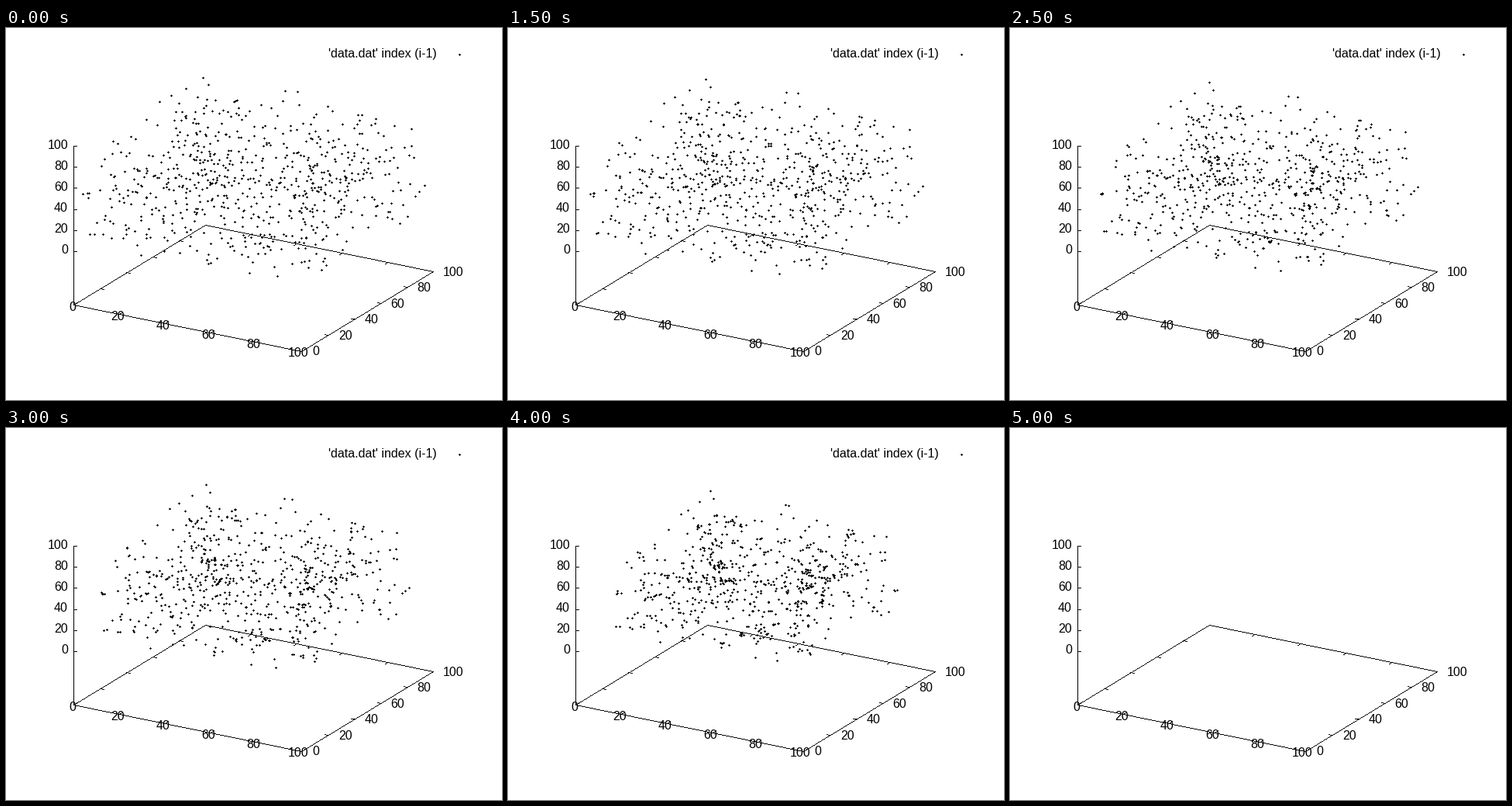
A matplotlib script that plays this animation: 640 by 480 pixels, repeating every 5.5 s.

```python
import numpy as np
import matplotlib.pyplot as plt
from matplotlib.animation import FuncAnimation
from matplotlib.collections import LineCollection

plt.rcParams["font.family"] = "Liberation Sans"

W, H, DPI = 640, 480, 80
PX = 72 / DPI                       # one pixel in points
FRAMES, INTERVAL = 11, 500
COUNT, PULL, SOFT = 700, 6000.0, 2.5
STEP, SUBSTEPS = 0.1, 5             # seconds, steps per picture

# Screen position of (x, y, z): ORIGIN + VIEW @ (x, y, z)
ORIGIN = np.array([87.4, 288.0])
VIEW = np.array([[2.94, 1.70, 0.0], [0.60, -1.03, -1.36]])
FLOOR = -50.5                       # z of the base plane

# Outermost particles on each side of the cloud
KEYS = np.array([(99, 214), (540, 203), (254, 64), (350, 320)], float)


def project(p):
    return ORIGIN + np.asarray(p, float) @ VIEW.T


def chord(uv):
    """Middle and length of the sight line through the cube at uv."""
    ray = np.cross(VIEW[0], VIEW[1])
    ray /= np.abs(ray).max()
    centre = np.full(3, 50.0)
    base = centre + (uv - project(centre)) @ np.linalg.pinv(VIEW).T
    a, b = -base / ray, (100 - base) / ray
    lo, hi = np.minimum(a, b).max(1), np.maximum(a, b).min(1)
    return base + ((lo + hi) / 2)[:, None] * ray, hi - lo


def bump(uv, centre, size):
    return np.exp(-((uv - centre) ** 2).sum(1) / (2 * size ** 2))


def start():
    """Nearly even cube of particles with two loose clumps and a gap between."""
    rng = np.random.default_rng(12)
    p = rng.uniform(0, 100, (6000, 3))
    uv = project(p)
    density = (0.6 + 0.2 * bump(uv, (262, 165), 38) + 0.35 * bump(uv, (388, 217), 28)
               - 0.3 * bump(uv, (325, 200), 28))
    inside = np.all((uv > KEYS.min(0)) & (uv < KEYS.max(0)), axis=1)
    keep = inside & (chord(uv)[1] > 6) & (rng.random(len(p)) < density)
    return np.vstack([chord(KEYS)[0], p[keep][:COUNT - len(KEYS)]])


def gravity(p):
    gap = p[None] - p[:, None]
    near = (gap ** 2).sum(2) + SOFT ** 2
    return PULL / COUNT * np.einsum("ij,ijk->ik", near ** -1.5, gap)


def simulate():
    p = start()
    v = np.zeros_like(p)
    a = gravity(p)
    shots = [project(p)]
    for _ in range(FRAMES - 2):
        for _ in range(SUBSTEPS):
            v += a * STEP / 2
            p = p + v * STEP
            a = gravity(p)
            v += a * STEP / 2
        shots.append(project(p))
    return shots


fig = plt.figure(figsize=(W / DPI, H / DPI), dpi=DPI, facecolor="white")
ax = fig.add_axes([0, 0, 1, 1])
ax.set(xlim=(0, W), ylim=(H, 0))
ax.axis("off")


def pixels(xy):
    """One-pixel-long segments covering the pixels at xy."""
    xy = np.round(xy)
    return np.stack([xy + (0, 0.5), xy + (1, 0.5)], axis=1)


def pixel_layer(xy):
    layer = LineCollection(pixels(xy), colors="black", linewidths=PX, capstyle="butt")
    layer.set_snap(False)
    return ax.add_collection(layer, autolim=False)


def crosses(uv):
    arms = np.array([(0, 0), (-1, 0), (1, 0), (0, -1), (0, 1)])
    return (np.round(uv)[:, None] + arms).reshape(-1, 2)


def stroke(a, b):
    """Pixels of a hard-edged line from a to b."""
    a, b = np.round(a), np.round(b)
    return np.linspace(a, b, int(np.abs(b - a).max()) + 1)


def edge(a, b):
    return stroke(project(a), project(b))


def label(x, y, text, ha):
    return ax.text(x, y, text, ha=ha, va="baseline", fontsize=16 * PX, color="black")


corners = [(0, 0, FLOOR), (100, 0, FLOOR), (100, 100, FLOOR), (0, 100, FLOOR)]
frame = [edge(a, b) for a, b in zip(corners, corners[1:] + corners[:1])]
frame.append(edge(corners[0], (0, 0, 100)))
for k in range(6):
    t = 20 * k
    frame += [edge((t, 0, FLOOR), (t, 2.2, FLOOR)),
              edge((t, 100, FLOOR), (t, 97.8, FLOOR)),
              edge((0, t, FLOOR), (1.5, t, FLOOR)),
              edge((100, t, FLOOR), (98.5, t, FLOOR))]
    tick = project((0, 0, t))
    frame.append(stroke(tick, tick + (4, 0)))
    label(80, 291 - 27.1 * k, str(t), "right")
    label(86 + 58.3 * k, 365 + 11.9 * k, str(t), "center")
    label(395.5 + 33.7 * k, 422 - 20.4 * k, str(t), "left")
pixel_layer(np.vstack(frame))

shots = simulate()
dots = pixel_layer(crosses(shots[0]))
key = label(556, 38, "'data.dat' index (i-1)", "right")
key_dot = pixel_layer(crosses(np.array([(585, 34)])))


def draw(i):
    shown = i < len(shots)
    for item in (key, key_dot, dots):
        item.set_visible(shown)
    if shown:
        dots.set_segments(pixels(crosses(shots[i])))
    return key, key_dot, dots


anim = FuncAnimation(fig, draw, frames=FRAMES, interval=INTERVAL, repeat=True, repeat_delay=0)
plt.show()
```
